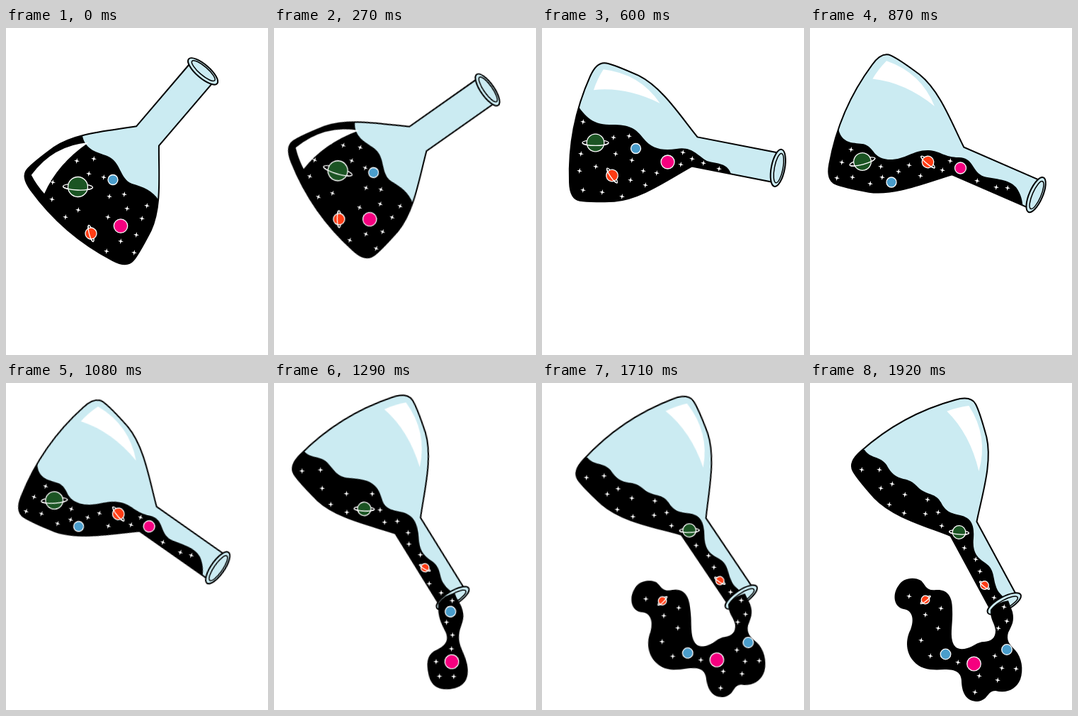
An HTML page without scripts that plays this animation: 370 by 460 pixels, repeating every 1.95 s.

```html
<!DOCTYPE html>
<html lang="en">
<head>
<meta charset="utf-8">
<title>Pouring space</title>
<style>
html, body { margin: 0; width: 100%; height: 100%; overflow: hidden; background: #fff; }
svg { display: block; width: 370px; height: 460px; }

/* Five drawings, 13 steps of 30 ms each, every one turning on its own pivot */
.pose {
  visibility: hidden;
  transform-origin: var(--o);
  animation: turn 1950ms steps(13, end) calc((var(--i) - 5) * 390ms) infinite;
}
@keyframes turn {
  0% { transform: rotate(var(--a)); visibility: visible; }
  20%, 100% { transform: rotate(var(--b)); visibility: hidden; }
}
.p1 { --i: 0; --o: 186px 167px; --a: 0deg; --b: 20.7deg; }
.p2 { --i: 1; --o: 188px 148px; --a: -11.2deg; --b: 9.6deg; }
.p3 { --i: 2; --o: 184px 148px; --a: -4.95deg; --b: 16.5deg; }
.p4 { --i: 3; --o: 158px 232px; --a: -12deg; --b: 2.2deg; }
.p5 { --i: 4; --o: 182px 233px; --a: -9.5deg; --b: .8deg; }

.line { fill: none; stroke: #000; stroke-width: 2; }
.glass { fill: #cbebf2; }
.ball, .ring { stroke: #fff; stroke-width: 1.3; vector-effect: non-scaling-stroke; }
.ring { fill: none; }
.green { fill: #1b5423; }
.blue { fill: #4a9dcb; }
.pink { fill: #f5007f; }
.orange { fill: #ff3c14; }
.stars { fill: none; stroke: none; marker: url(#star); }
</style>
</head>
<body>
<svg viewBox="0 0 370 460" xmlns="http://www.w3.org/2000/svg">
<defs>
  <!-- Flask: neck base at 0,0 and mouth towards +x -->
  <path id="body" d="M116 -21L0 -21C-30 -46 -62 -80 -98 -90C-115 -94 -136 -98.5 -146 -98.5Q-160 -98.5 -165 -76C-177 -25 -177 25 -165 76Q-160 98.5 -146 98.5C-136 98.5 -115 94 -98 90C-62 80 -30 46 0 21L116 21Z"/>
  <g id="front">
    <use href="#body" class="line"/>
    <path fill="#fff" d="M-148.5 -89Q-97 -93 -61 -57.5Q-113 -71.5 -156.5 -58Q-154.5 -74 -148.5 -89Z"/>
    <ellipse class="line" style="fill:#cbebf2" cx="120" rx="9.5" ry="26.5"/>
    <ellipse class="line" style="stroke-width:1.5" cx="121" rx="6" ry="21"/>
  </g>
  <clipPath id="c1"><use href="#body" transform="translate(200 152) rotate(-49.4)"/></clipPath>
  <clipPath id="c2"><use href="#body" transform="translate(215.5 174) rotate(11)"/></clipPath>
  <clipPath id="c3"><use href="#body" transform="translate(209 187) rotate(23.4)"/></clipPath>
  <clipPath id="c4"><use href="#body" transform="translate(193 205) rotate(65.8)"/></clipPath>
  <clipPath id="c5"><use href="#body" transform="translate(217 205) rotate(61.5)"/></clipPath>

  <marker id="star" markerUnits="userSpaceOnUse" markerWidth="10" markerHeight="10" refX="0" refY="0" viewBox="-5 -5 10 10">
    <path fill="#fff" transform="rotate(8)" d="M0 -4L.9 -.9L4 0L.9 .9L0 4L-.9 .9L-4 0L-.9 -.9Z"/>
  </marker>

  <!-- Planets of radius 1 -->
  <circle id="ball" class="ball" r="1"/>
  <g id="ringed">
    <ellipse class="ring" rx="1.5" ry=".32"/>
    <circle class="ball" r="1"/>
    <path class="ring" d="M-1.5 0A1.5 .32 0 0 0 1.5 0"/>
  </g>
</defs>

<g class="pose p1">
  <use href="#body" class="glass" transform="translate(200 152) rotate(-49.4)"/>
  <path clip-path="url(#c1)" d="M108 140V152C112 172 130 175 143 180C163 188 160 212 178 219C194 224 207 228 216 243L220 345H0V140Z"/>
  <use href="#front" transform="translate(200 152) rotate(-49.4)"/>
  <polyline class="stars" points="97,172 80,189 100,187 124,184 117,205 138,210 66,217 65,241 84,266 102,256 146,237 167,234 171,254 199,250 144,266 192,268 184,291 162,300 142,314 181,316"/>
  <use href="#ringed" class="green" transform="translate(101.5 223.5) rotate(2) scale(14)"/>
  <use href="#ball" class="blue" transform="translate(151 213.5) scale(7)"/>
  <use href="#ball" class="pink" transform="translate(162 278.5) scale(9.7)"/>
  <use href="#ringed" class="orange" transform="translate(120 289) rotate(75) scale(8)"/>
</g>

<g class="pose p2">
  <use href="#body" class="glass" transform="translate(215.5 174) rotate(11)"/>
  <path clip-path="url(#c2)" d="M45 100C58 122 70 136 95 136C120 136 130 138 143 155C155 170 170 173 190 170C212 166 220 180 233 187C248 192 262 188 268 208V260H0V100Z"/>
  <use href="#front" transform="translate(215.5 174) rotate(11)"/>
  <polyline class="stars" points="58,132 101,154 123,152 55,177 104,177 76,195 53,201 127,186 143,201 162,204 125,214 146,221 58,228 85,231 113,237 199,175 212,184 196,192 228,190 250,198"/>
  <use href="#ringed" class="green" transform="translate(75.5 161.5) scale(12.3)"/>
  <use href="#ball" class="blue" transform="translate(132.5 169.5) scale(7)"/>
  <use href="#ball" class="pink" transform="translate(177.5 188.5) scale(9.5)"/>
  <use href="#ringed" class="orange" transform="translate(99 207.5) rotate(55) scale(8.3)"/>
</g>

<g class="pose p3">
  <use href="#body" class="glass" transform="translate(209 187) rotate(23.4)"/>
  <path clip-path="url(#c3)" d="M40 142C46 167 68 160 78 164C92 170 88 182 110 185C135 186 145 171 168 172C184 173 190 182 210 182C232 182 228 203 246 209C262 213 280 212 291 224C299 235 300 244 301 255V275H0V142Z"/>
  <use href="#front" transform="translate(209 187) rotate(23.4)"/>
  <polyline class="stars" points="58,171 45,189 38,211 60,210 85,219 100,195 102,210 125,202 140,193 156,208 187,200 198,187 236,215 263,224 279,225"/>
  <use href="#ringed" class="green" transform="translate(74 188) rotate(-15) scale(12.3)"/>
  <use href="#ringed" class="orange" transform="translate(166.5 188.5) rotate(40) scale(8.3)"/>
  <use href="#ball" class="blue" transform="translate(115 217) scale(7)"/>
  <use href="#ball" class="pink" transform="translate(212.5 197) scale(8)"/>
</g>

<g class="pose p4">
  <use href="#body" class="glass" transform="translate(193 205) rotate(65.8)"/>
  <path clip-path="url(#c4)" d="M62 82C68 93 84 91 92 102C101 115 103 123 117 127C136 131 147 134 154 143C160 151 160 156 162 165C164 178 176 181 187 185C203 191 207 204 206 222C204 243 210 250 220 259C232 270 227 282 232 292C236 301 241 303 244 310L218 335L0 250V82Z"/>
  <use href="#front" transform="translate(193 205) rotate(65.8)"/>
  <path d="M221 319C217 338 222 349 226 361C230 377 218 381 206 385C195 390 193 402 194 415C195 432 203 440 222 441C242 441 251 430 250 410C249 393 241 383 244 368C246 356 254 350 254 338C254 324 248 320 246 308Q232 308 221 319Z"/>
  <polyline class="stars" points="55,109 81,111 80,137 89,161 113,149 149,154 157,178 110,175 161,196 179,197 192,215 191,231 205,248 212,290 227,305 241,318 229,347 235,366 231,385 207,400 209,421 229,424"/>
  <use href="#ringed" class="green" transform="translate(135 173.5) rotate(10) scale(9.5)"/>
  <use href="#ringed" class="orange" transform="translate(209 267) rotate(38) scale(5.8)"/>
  <use href="#ball" class="blue" transform="translate(236.5 333) scale(7.5)"/>
  <use href="#ball" class="pink" transform="translate(229 403) scale(9.8)"/>
</g>

<g class="pose p5">
  <use href="#body" class="glass" transform="translate(217 205) rotate(61.5)"/>
  <path clip-path="url(#c5)" d="M77 94C84 106 100 103 108 115C115 128 121 132 132 135C148 138 150 146 158 151C170 158 178 156 185 168C192 182 200 183 212 186C230 190 232 203 231 218C229 238 236 245 246 252C260 261 258 270 262 284C265 296 272 298 277 306L255 335L0 270V94Z"/>
  <use href="#front" transform="translate(217 205) rotate(61.5)"/>
  <path d="M255 319C254 332 261 338 262 348C262 359 256 363 246 364C236 364 231 371 222 373C212 376 204 374 201 363C198 350 202 338 201 318C201 300 194 290 178 291C164 293 163 284 157 278C147 272 131 274 125 285C116 297 118 315 132 318C146 320 147 334 142 347C134 362 136 380 146 391C157 404 173 404 190 403C206 403 214 407 214 421C215 438 222 448 237 448C252 446 250 433 262 433C278 437 291 431 297 417C302 403 299 386 290 376C281 367 277 362 280 351C285 341 289 335 286 322L280 306Q265 308 255 319Z"/>
  <polyline class="stars" points="73,122 98,122 100,148 116,142 134,157 166,164 112,171 133,183 163,184 181,182 186,201 218,232 234,248 240,265 260,302 274,315 278,335 266,345 140,300 185,317 163,326 181,345 157,362 170,384 209,393 261,384 271,401 291,402 239,412 265,418 233,435"/>
  <use href="#ringed" class="green" transform="translate(210.5 210) rotate(4) scale(9.3)"/>
  <use href="#ringed" class="orange" transform="translate(246.5 284.5) rotate(38) scale(5.8)"/>
  <use href="#ringed" class="orange" transform="translate(163 305) rotate(-38) scale(5.8)"/>
  <use href="#ball" class="blue" transform="translate(191.5 381.5) scale(7.3)"/>
  <use href="#ball" class="blue" transform="translate(278 375) scale(7.3)"/>
  <use href="#ball" class="pink" transform="translate(231.5 395) scale(9.8)"/>
</g>
</svg>
</body>
</html>
```
